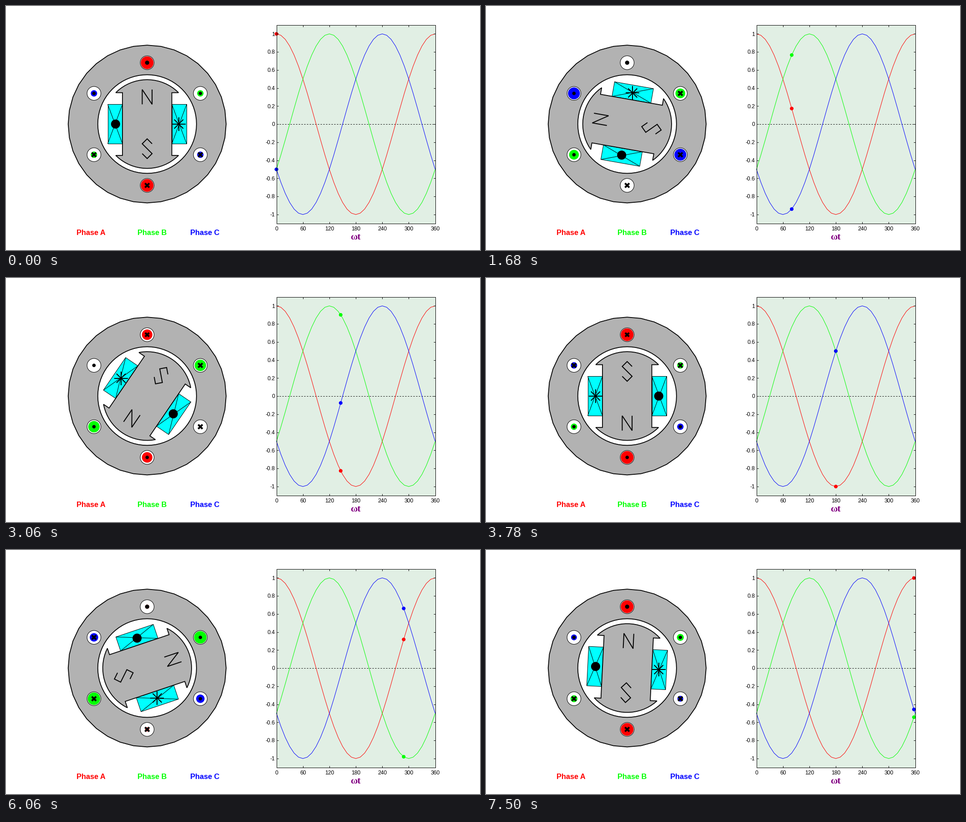
Recreate the animation shown at these times as a matplotlib script. Size 1042 by 537 pixels, loop 7560 ms.

```python
import numpy as np
import matplotlib.pyplot as plt
from matplotlib.animation import FuncAnimation
from matplotlib.patches import Circle, Polygon, Rectangle

W, H, DPI = 1042, 537, 100
FRAMES, INTERVAL = 126, 60
PT = 72 / DPI
RED, GREEN, BLUE = "#ff0000", "#00ff00", "#0000ff"
COLORS = (RED, GREEN, BLUE)
GREY, CYAN = "#b2b2b2", "#00ffff"

CX, CY, UNIT = 309.8, 259.3, 108.5                # machine centre and scale
LEFT, RIGHT, TOP, BOTTOM = 594, 943, 41, 478.3    # plot box

fig = plt.figure(figsize=(W / DPI, H / DPI), dpi=DPI, facecolor="white")
ax = fig.add_axes([0, 0, 1, 1])
ax.set_xlim(-0.5, W - 0.5)
ax.set_ylim(H - 0.5, -0.5)
ax.axis("off")


def line(xs, ys, color="black", width=1, z=2, **kw):
    kw.setdefault("solid_capstyle", "butt")
    return ax.plot(xs, ys, color=color, lw=width * PT, zorder=z, **kw)[0]


def shape(points, face, width, z):
    patch = Polygon(points, closed=True, fc=face, ec="black", lw=width * PT,
                    zorder=z, joinstyle="miter")
    return ax.add_patch(patch)


def disc(x, y, r, face, z, edge="none", width=0):
    patch = Circle((x, y), r, fc=face, ec=edge, lw=width * PT, zorder=z)
    return ax.add_patch(patch)


def label(x, y, text, size, color="black", **kw):
    kw.setdefault("family", "Liberation Sans")
    return ax.text(x, y, text, fontsize=size * PT, color=color, zorder=12,
                   va="baseline", **kw)


def arc(r, start, stop, step=10):
    a = np.radians(np.arange(start, stop + 1, step))
    return np.column_stack([r * np.cos(a), r * np.sin(a)])


def place(points, angle=0.0):
    """Turn machine points counter-clockwise and map them to pixels."""
    p = np.asarray(points, dtype=float)
    c, s = np.cos(angle), np.sin(angle)
    x = p[:, 0] * c - p[:, 1] * s
    y = p[:, 0] * s + p[:, 1] * c
    return np.column_stack([CX + UNIT * x, CY - UNIT * y])


def currents(deg):
    return np.cos(np.radians(deg - np.array([0, 120, 240])))


def plot_x(deg):
    return LEFT + (RIGHT - LEFT) * deg / 360


def plot_y(v):
    return (TOP + BOTTOM) / 2 - (BOTTOM - TOP) * v / 2.2


# Stator
shape(place(arc(1.6, 0, 350)), GREY, 1.8, 1)
shape(place(arc(1.0, 0, 355, 5)), "white", 1.8, 2)


class Slot:
    def __init__(self, phase, deg, sign, dot_r, arm):
        self.phase, self.sign = phase, sign
        a = np.radians(deg)
        x = CX + 135 * np.cos(a)
        y = CY - 135 * np.sin(a)
        disc(x, y, 15.2, "white", 3, "black", 1)
        self.fill = disc(x, y, 14, COLORS[phase], 4)
        self.dot = disc(x, y, dot_r, "black", 5)
        self.cross = [line([x - arm, x + arm], [y - d, y + d], width=4, z=5)
                      for d in (arm, -arm)]

    def update(self, amps):
        i = amps[self.phase]
        outward = i * self.sign > 0
        self.fill.set_radius(14 * abs(i))
        self.dot.set_visible(outward)
        for arm in self.cross:
            arm.set_visible(not outward)


slots = [
    Slot(0, 90, 1, 4.6, 4.2), Slot(0, 270, -1, 3.8, 4.7),
    Slot(1, 30, -1, 3.8, 4.7), Slot(1, 210, 1, 3.8, 4.7),
    Slot(2, 150, -1, 3.8, 4.7), Slot(2, 330, 1, 3.8, 4.7),
]

# Rotor outline, windings and pole letters
TIP = 0.9 * np.sin(np.pi / 4)
HALF = np.vstack([[[0.5, TIP]], arc(0.9, 45, 135, 5), [[-0.5, TIP]]])
ROTOR = np.vstack([HALF, -HALF])
COIL = np.array([(0.5, 0.4), (0.8, 0.4), (0.8, -0.4), (0.5, -0.4)])
LETTER_N = [(-0.1, 0.4), (-0.1, 0.7), (0.1, 0.4), (0.1, 0.7)]
LETTER_S = [(0.1, -0.4), (0, -0.3), (-0.1, -0.4),
            (0.1, -0.6), (0, -0.7), (-0.1, -0.6)]

moving = []     # (artist, points) pairs that turn with the rotor
for side in (1, -1):
    corners = COIL * side
    moving.append((shape(place(corners), CYAN, 1, 6), corners))
    for k in (0, 1):
        pair = corners[[k, k + 2]]
        moving.append((line([], [], z=6.5), pair))
moving.append((shape(place(ROTOR), GREY, 1.8, 7), ROTOR))
for letter in (LETTER_N, LETTER_S):
    moving.append((line([], [], width=2, z=8, solid_joinstyle="miter"), letter))

coil_dot = disc(0, 0, 10, "black", 9)
star = [(line([], [], width=2, z=9), arm)
        for arm in ((15, 0), (0, 15), (10, 10), (10, -10))]

# Plot of the three currents
ax.add_patch(Rectangle((LEFT, TOP), RIGHT - LEFT, BOTTOM - TOP,
                       fc="#e1efe4", ec="none", zorder=1))
line([LEFT, RIGHT], [plot_y(0)] * 2, z=2, linestyle=(0, (3, 3)),
     dash_capstyle="butt")
degs = np.arange(0, 361, 10)
waves = np.array([currents(d) for d in degs])
for k, color in enumerate(COLORS):
    line(plot_x(degs), plot_y(waves[:, k]), color, z=3 + k / 10)

line([LEFT, RIGHT, RIGHT, LEFT, LEFT], [TOP, TOP, BOTTOM, BOTTOM, TOP], z=11,
     solid_joinstyle="miter")
for d in range(0, 361, 60):
    x = plot_x(d)
    line([x, x], [BOTTOM, BOTTOM - 4], z=11)
    line([x, x], [TOP, TOP + 4], z=11)
    label(x + 0.5, 493, str(d), 12, ha="center")
for n in range(-5, 6):
    y = plot_y(n / 5)
    line([LEFT, LEFT + 4], [y, y], z=11)
    line([RIGHT, RIGHT - 4], [y, y], z=11)
    label(590.5, y + 4.3, f"{n / 5:g}", 12, ha="right")
label(767.5, 513, "ωt", 21, "#800080", ha="center",
      family="Liberation Serif", weight="bold")

for x, name, color in zip((186.5, 320.5, 437), "ABC", COLORS):
    label(x, 503.5, "Phase " + name, 16.4, color, ha="center", weight="bold")

tracers = [disc(LEFT, TOP, 4, c, 10 + k / 10) for k, c in enumerate(COLORS)]


def draw(n):
    deg = 360 * n / FRAMES
    angle = np.radians(deg)
    amps = currents(deg)
    for artist, points in moving:
        p = place(points, angle)
        if isinstance(artist, Polygon):
            artist.set_xy(p)
        else:
            artist.set_data(p[:, 0], p[:, 1])
    (sx, sy), (dx, dy) = place([(0.64, 0), (-0.64, 0)], angle)
    coil_dot.center = (dx, dy)
    for arm, (ux, uy) in star:
        arm.set_data([sx - ux, sx + ux], [sy - uy, sy + uy])
    for slot in slots:
        slot.update(amps)
    for tracer, i in zip(tracers, amps):
        tracer.center = (plot_x(deg), plot_y(i))
    return []


anim = FuncAnimation(fig, draw, frames=FRAMES, init_func=lambda: draw(0),
                     interval=INTERVAL, repeat=True, repeat_delay=0, blit=False)
plt.show()
```
